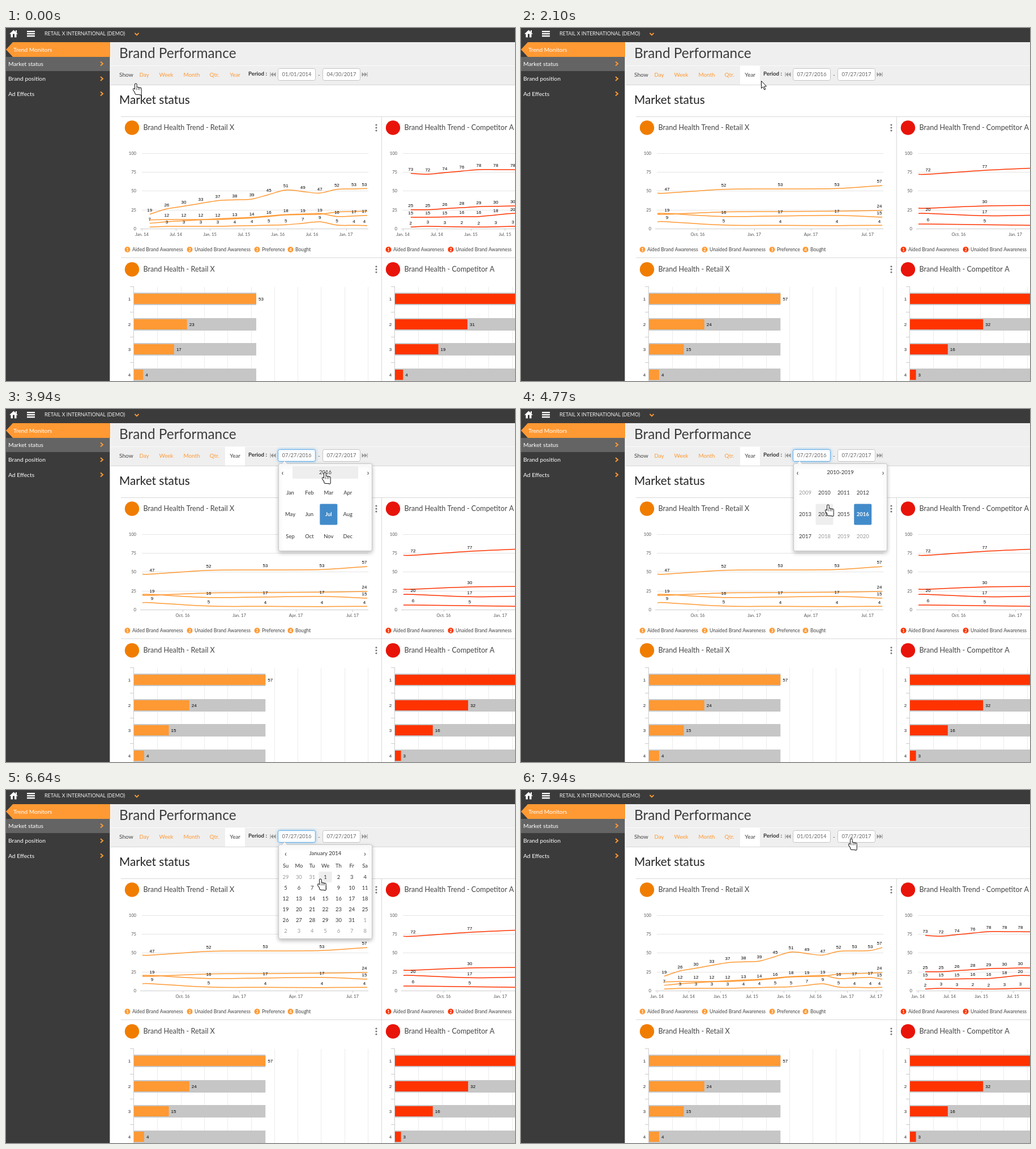
These frames come from a looping animation (899x623 px, 8000 ms). An HTML page with a canvas:

```html
<!DOCTYPE html>
<html lang="en">
<head>
<meta charset="utf-8">
<title>Brand Performance</title>
<style>
html, body { margin: 0; width: 100%; height: 100%; overflow: hidden; background: #fff; }
canvas { display: block; width: 899px; height: 623px; }
</style>
</head>
<body>
<canvas id="stage" width="899" height="623"></canvas>
<script>
const ctx = document.getElementById('stage').getContext('2d');
const LOOP = 8000;
const ORANGE = '#ff9933', RED = '#ff3300', INK = '#333', DARK = '#3b3b3b', MUTED = '#999';
const UI = 'Lato, "Open Sans", sans-serif';
const NUM = '"Liberation Sans", Arial, sans-serif';
const MONTHS = 'Jan Feb Mar Apr May Jun Jul Aug Sep Oct Nov Dec'.split(' ');
const YEARS = Array.from({ length: 12 }, (_, i) => 2009 + i);

// ---------- drawing helpers ----------
function rect(x, y, w, h, color) {
  ctx.fillStyle = color;
  ctx.fillRect(x, y, w, h);
}

function text(str, x, y, size, color = INK, { align = 'left', weight = 400, font = UI } = {}) {
  ctx.font = `${weight} ${size}px ${font}`;
  ctx.fillStyle = color;
  ctx.textAlign = align;
  ctx.fillText(str, x, y + size * 0.36);
}

const centered = (str, x, y, size, color, opts) =>
  text(str, x, y, size, color, { align: 'center', ...opts });

function disc(x, y, r, color) {
  ctx.fillStyle = color;
  ctx.beginPath();
  ctx.arc(x, y, r, 0, 7);
  ctx.fill();
}

function trace(points) {
  ctx.beginPath();
  points.forEach(([x, y]) => ctx.lineTo(x, y));
}

function outline(color, width = 1) {
  ctx.strokeStyle = color;
  ctx.lineWidth = width;
  ctx.stroke();
}

function poly(points, color, stroke) {
  trace(points);
  ctx.closePath();
  ctx.fillStyle = color;
  ctx.fill();
  if (stroke) outline(stroke);
}

function polyline(points, color, width) {
  trace(points);
  outline(color, width);
}

function box(x, y, w, h, r, fill, stroke) {
  ctx.beginPath();
  ctx.roundRect(x, y, w, h, r);
  ctx.fillStyle = fill;
  ctx.fill();
  if (stroke) outline(stroke);
}

function shadowed(color, blur, dy, draw) {
  ctx.save();
  ctx.shadowColor = color;
  ctx.shadowBlur = blur;
  ctx.shadowOffsetY = dy;
  draw();
  ctx.restore();
}

// ---------- data: quarters counted from January 2014, linear between knots ----------
const KNOTS = [0, 1, 4, 6, 8, 10, 11, 13, 14];

function between(values) {
  return q => {
    const i = Math.max(1, KNOTS.findIndex(k => k >= q));
    const p = (q - KNOTS[i - 1]) / (KNOTS[i] - KNOTS[i - 1]);
    return values[i - 1] + (values[i] - values[i - 1]) * p;
  };
}

const retail = [
  [19, 26, 37, 39, 51, 47, 52, 53, 57],
  [11.5, 12, 12, 14, 18, 19, 22, 23, 24],
  [7, 9, 13, 15, 18.5, 20, 16, 17.4, 15.1],
  [2, 3, 3, 4, 5, 9, 4.6, 4, 4.4]
].map(between);
const rival = [
  [73, 72, 78, 78, 77, 72, 77, 84, 85],
  [25, 25, 29, 30, 30, 27, 30, 31.4, 31.7],
  [15, 15, 16, 20, 19, 20, 17, 18.8, 16.4],
  [2, 3, 2, 3, 3, 6, 5, 3.5, 2.6]
].map(between);

// ---------- time axis ----------
function toYear(date) {
  const [m, d, y] = date.split('/').map(Number);
  return y + (m - 1) / 12 + (d - 1) / 372;
}

function timeAxis(range) {
  const [from, to] = range.map(toYear);
  const x = year => 240 + 400 * (year - from) / (to - from);
  const start = q => 2014 + q / 4;
  const quarters = [...Array(15).keys()].filter(q => start(q) < to && start(q + 1) > from);
  const step = to - from > 2 ? 0.5 : 0.25;
  const ticks = [];
  for (let y = Math.ceil(from / step) * step; y <= to; y += step) {
    ticks.push([`${MONTHS[(y % 1) * 12]}. ${Math.floor(y) - 2000}`, Math.min(x(y), 627)]);
  }
  return {
    quarters, ticks,
    pointX: q => Math.min(x(start(q) + 0.115), 638),
    cut: from > start(quarters[0])
  };
}

// ---------- charts ----------
const valueY = v => 354 - v * 1.334;

function spline(points, color) {
  ctx.beginPath();
  ctx.moveTo(...points[0]);
  for (let i = 0; i < points.length - 1; i++) {
    const p = points[i], q = points[i + 1];
    const a = points[i - 1] || p, b = points[i + 2] || q;
    ctx.bezierCurveTo(p[0] + (q[0] - a[0]) / 6, p[1] + (q[1] - a[1]) / 6,
      q[0] - (b[0] - p[0]) / 6, q[1] - (b[1] - p[1]) / 6, ...q);
  }
  outline(color, 1.5);
}

// Labels are placed by priority; one that would crowd another is left out.
function pointLabels(x, [a, b, c, d]) {
  const placed = [];
  const [first, second] = c < b - 3 ? [c, b] : [b, c];
  [a, first, d, second].forEach(v => {
    const y = valueY(v) - 7.5;
    if (placed.some(p => Math.abs(p - y) < 10)) return;
    placed.push(y);
    centered(Math.round(v), Math.min(x, 633), y, 8, '#000', { font: NUM });
  });
}

function trendChart(axis, series, color) {
  for (let v = 0; v <= 100; v += 25) {
    const y = Math.round(valueY(v));
    rect(v ? 240 : 237, y, v ? 400 : 403, 1, v ? '#e4e4e4' : '#ccc');
    text(v, 230, y, 7.6, '#555', { align: 'right' });
  }
  axis.ticks.forEach(([name, x]) => {
    rect(Math.round(x), 354, 1, 4, '#ccc');
    centered(name, x, 364, 7.6, '#555');
  });
  series.forEach(value => {
    const points = axis.quarters.map(q => [axis.pointX(q), valueY(value(q))]);
    if (axis.cut) points.unshift([241, points[0][1]]);
    spline(points, color);
  });
  axis.quarters.forEach(q => pointLabels(axis.pointX(q), series.map(value => value(q))));
}

function barChart(values, color) {
  const scale = 4.075;
  for (let i = 1; i <= 10; i++) rect(Math.round(226 + i * 41.3), 457, 1, 166, '#ececec');
  rect(225, 456, 1, 167, '#ccc');
  values.forEach((v, i) => {
    const y = Math.round(478 + i * 44.6);
    rect(219, y - 22, 7, 1, '#ccc');
    rect(226, y - 11, values[0] * scale, 22, '#c6c6c6');
    rect(226, y - 9, v * scale, 18, color);
    centered(i + 1, 218, y, 8, '#222', { font: NUM });
    text(Math.round(v), 230 + v * scale, y, 8, '#000', { font: NUM });
  });
}

function panel(dx, name, badge, color, axis, series) {
  ctx.save();
  ctx.translate(dx, 0);
  [[176, 'Brand Health Trend - '], [426, 'Brand Health - ']].forEach(([y, title]) => {
    disc(222.5, y, 12.7, badge);
    text(title + name, 242.5, y - 1, 12.6, '#444');
    [-5, 0, 5].forEach(d => disc(654, y + d, 1.6, '#777'));
  });
  trendChart(axis, series, color);
  [['Aided Brand Awareness', 214], ['Unaided Brand Awareness', 324],
    ['Preference', 443], ['Bought', 502]].forEach(([label, x], i) => {
    disc(x + 0.5, 391, 5, color);
    centered(i + 1, x + 0.5, 391, 7, '#fff', { weight: 700 });
    text(label, x + 9, 391, 8.6, '#444');
  });
  barChart(series.map(value => value(axis.quarters.at(-1))), color);
  ctx.restore();
}

// ---------- page chrome ----------
function sidebar() {
  rect(0, 0, 899, 25, DARK);
  rect(0, 25, 183, 598, DARK);
  rect(183, 25, 1, 598, '#b8b8b8');
  poly([[6, 10.5], [13.5, 3.5], [21, 10.5]], '#fff');
  rect(17, 4, 2, 4, '#fff');
  [8.5, 15].forEach(x => rect(x, 10, 3.5, 6.5, '#fff'));
  [5, 9, 13].forEach(y => rect(37, y, 14, 2.4, '#fff'));
  text('RETAIL X INTERNATIONAL (DEMO)', 68, 10, 8.9, '#eee');
  polyline([[227.5, 9], [231, 12.5], [234.5, 9]], ORANGE, 1.8);
  poly([[0, 38], [12, 25], [184, 25], [184, 51], [12, 51]], ORANGE);
  text('Trend Monitors', 13, 38, 10.2, '#fff');
  rect(0, 51, 183, 25, '#646464');
  ['Market status', 'Brand position', 'Ad Effects'].forEach((label, i) => {
    const y = 63 + i * 26.5;
    text(label, 4, y, 10.3, '#fff');
    polyline([[167, y - 3.5], [171, y], [167, y + 3.5]], ORANGE, 2);
  });
}

const buttons = [
  ['Day', 225, 263], ['Week', 261, 305], ['Month', 305, 351], ['Qtr.', 350, 386], ['Year', 387, 422]
];
const inside = (c, l, t, r, b) => c.x > l && c.x < r && c.y > t && c.y < b;

function skipIcon(x, dir) {
  [0, 4.5].forEach(o => {
    const tip = x + dir * (o - 4);
    poly([[tip, 82], [tip + dir * 4.5, 78], [tip + dir * 4.5, 86]], MUTED);
  });
  rect(x - dir * 4.5 - 0.5, 78, 1, 8, MUTED);
}

function dateInput(x, value, focused, cur) {
  const draw = () => box(x + 0.5, 71.5, 66, 21, 3, '#fff', focused ? '#66afe9' : '#c4c4c4');
  if (focused) shadowed('rgba(102,175,233,.6)', 5, 0, draw);
  else draw();
  centered(value, x + 33.5, 82, 9.4, '#666');
  return inside(cur, x, 71, x + 67, 93);
}

function toolbar(state, cur) {
  rect(185, 25, 714, 76, '#efefef');
  rect(185, 66, 714, 1, '#fafafa');
  rect(185, 100, 714, 1, '#d6d6d6');
  text('Brand Performance', 200, 44.5, 24.4, '#3c3c3c');
  text('Show', 200, 82, 10.2, '#444');
  let hit = false;
  buttons.forEach(([label, l, r]) => {
    const lit = (label === 'Year' && state.yearOn) || inside(cur, l + 5, 67, r - 5, 100);
    if (lit) rect(l, 67, r - l, 33, '#fff');
    centered(label, (l + r) / 2, 82, 9.8, lit ? '#444' : ORANGE);
    hit = inside(cur, l, 67, r, 100) || hit;
  });
  text('Period :', 428, 81, 9.7, INK, { weight: 700 });
  skipIcon(471.5, 1);
  text('-', 551, 82, 10, '#555');
  skipIcon(633.5, -1);
  const [from, to] = state.dates;
  hit = dateInput(480, from, !!state.popup, cur) || hit;
  return dateInput(559, to, false, cur) || hit;
}

// ---------- date picker ----------
function cell(label, x, y, w, h, cur, { muted, active } = {}) {
  const hover = inside(cur, x - w / 2, y - h / 2 + 1, x + w / 2, y + h / 2);
  if (active || hover) box(x - w / 2, y - h / 2, w, h, 2, active ? '#428bca' : '#eee');
  centered(label, x, y, 9.4, active ? '#fff' : muted ? MUTED : INK, { weight: active ? 700 : 400 });
  return hover;
}

function dayGrid(year, month, selected, cur) {
  let hit = false;
  const lead = new Date(year, month, 1).getDay();
  const colX = i => 494 + i * 23.35;
  'Su Mo Tu We Th Fr Sa'.split(' ').forEach((d, i) => centered(d, colX(i), 134, 9.4, INK));
  for (let i = 0; i < 42; i++) {
    const date = new Date(year, month, 1 - lead + i);
    const muted = date.getMonth() !== month;
    const active = !muted && date.getDate() === selected;
    hit = cell(date.getDate(), colX(i % 7), 153.5 + Math.floor(i / 7) * 19.1, 23, 19, cur,
      { muted, active }) || hit;
  }
  return hit;
}

function wideGrid(labels, chosen, isMuted, cur) {
  return labels.map((label, i) => cell(label, 502 + (i % 4) * 33.9, 147.5 + Math.floor(i / 4) * 38.6,
    31, 37, cur, { active: label === chosen, muted: isMuted(label) })).some(Boolean);
}

const pickers = {
  july: ['July 2016', cur => dayGrid(2016, 6, 27, cur)],
  months16: ['2016', cur => wideGrid(MONTHS, 'Jul', () => false, cur)],
  years: ['2010-2019', cur => wideGrid(YEARS, 2016, y => y < 2010 || y > 2017, cur)],
  months14: ['2014', cur => wideGrid(MONTHS, '', () => false, cur)],
  january: ['January 2014', cur => dayGrid(2014, 0, 0, cur)]
};

function popup(kind, cur) {
  const [title, grid] = pickers[kind];
  const days = kind === 'july' || kind === 'january';
  shadowed('rgba(0,0,0,.25)', 7, 3, () =>
    box(481.5, 96.5, 165, days ? 166 : 154, 3, '#fff', '#c8c8c8'));
  const notch = [[487, 96.5], [492, 92], [497, 96.5]];
  poly(notch, '#fff');
  polyline(notch, '#c8c8c8', 1);
  const overTitle = inside(cur, 506, 101, 622, 123);
  if (overTitle && !days) box(506, 101, 116, 22, 2, '#eee');
  centered(title, 564, 112, 9.5, INK);
  centered('‹', days ? 494 : 488.5, 112, 14, INK);
  centered('›', days ? 634 : 639.5, 112, 14, INK);
  return grid(cur) || overTitle;
}

// ---------- pointer ----------
// Each stop is an arrival time and place; a move takes at most MOVE ms.
const MOVE = 500;
const stops = [
  [0, 229, 98], [480, 400, 92], [900, 291, 98], [1790, 402, 95], [2100, 424, 93], [2740, 509, 83],
  [3700, 563, 112], [4930, 536, 186], [5800, 502, 147], [6500, 555, 157], [7900, 583, 86]
];

function pointerAt(t) {
  const i = stops.findLastIndex(s => s[0] <= t);
  const [t0, x0, y0] = stops[i];
  const [t1, x1, y1] = stops[i + 1] || stops[i];
  const span = Math.min(MOVE, t1 - t0) || 1;
  const p = Math.max(0, 1 - (t1 - t) / span);
  const e = (1 - Math.cos(Math.PI * Math.min(p, 1))) / 2;
  return { x: x0 + (x1 - x0) * e, y: y0 + (y1 - y0) * e };
}

const ARROW = [[0, 0], [0, 13], [3, 10.3], [5.2, 15.5], [7.3, 14.6], [5.1, 9.6], [9, 9.4]];

function handShape() {
  const hand = new Path2D();
  for (let i = 0; i < 4; i++) hand.roundRect(-1.5 + i * 2.7, i ? 5.5 + i * 0.6 : 0, 2.6, 12, 1.3);
  hand.roundRect(-1.5, 9, 10.7, 9.5, 3);
  hand.ellipse(-2.3, 11.8, 1.3, 3.6, -0.6, 0, 7);
  return hand;
}

function drawPointer({ x, y }, overLink) {
  ctx.save();
  ctx.translate(Math.round(x) + 0.5, Math.round(y) + 0.5);
  if (overLink) {
    const hand = handShape();
    ctx.strokeStyle = '#111';
    ctx.lineWidth = 2;
    ctx.stroke(hand);
    ctx.fillStyle = '#fff';
    ctx.fill(hand);
    for (let i = 0; i < 3; i++) rect(0.8 + i * 2.7, 7, 0.7, 4, '#111');
  } else {
    poly(ARROW, '#fff', '#111');
  }
  ctx.restore();
}

// ---------- timeline ----------
const ranges = [
  ['01/01/2014', '04/30/2017'], ['07/27/2016', '07/27/2017'], ['01/01/2014', '07/27/2017']
];
const rangeAt = (t, second, third) => ranges[(t >= second) + (t >= third)];
const popups = [
  [2910, 'july'], [3860, 'months16'], [4190, 'years'], [5430, 'months14'], [5820, 'january'], [7180]
];

function stateAt(t) {
  const shown = popups.findLast(([from]) => t >= from);
  return {
    yearOn: t >= 580,
    dates: rangeAt(t, 640, 7180),
    axis: timeAxis(rangeAt(t, 720, 7410)),
    popup: shown && shown[1]
  };
}

function render(t) {
  const state = stateAt(t), cur = pointerAt(t);
  rect(0, 0, 899, 623, '#fff');
  let hand = toolbar(state, cur);
  text('Market status', 200, 127, 20.7, '#222');
  [156, 405].forEach(y => rect(203, y, 696, 1, '#d8d8d8'));
  rect(663, 156, 1, 467, '#d8d8d8');
  panel(0, 'Retail X', '#f07d00', ORANGE, state.axis, retail);
  panel(461, 'Competitor A', '#e8140a', RED, state.axis, rival);
  sidebar();
  if (state.popup) hand = popup(state.popup, cur) || hand;
  drawPointer(cur, hand);
}

const origin = performance.now();
function tick() {
  render((performance.now() - origin) % LOOP);
  requestAnimationFrame(tick);
}
tick();
</script>
</body>
</html>
```
